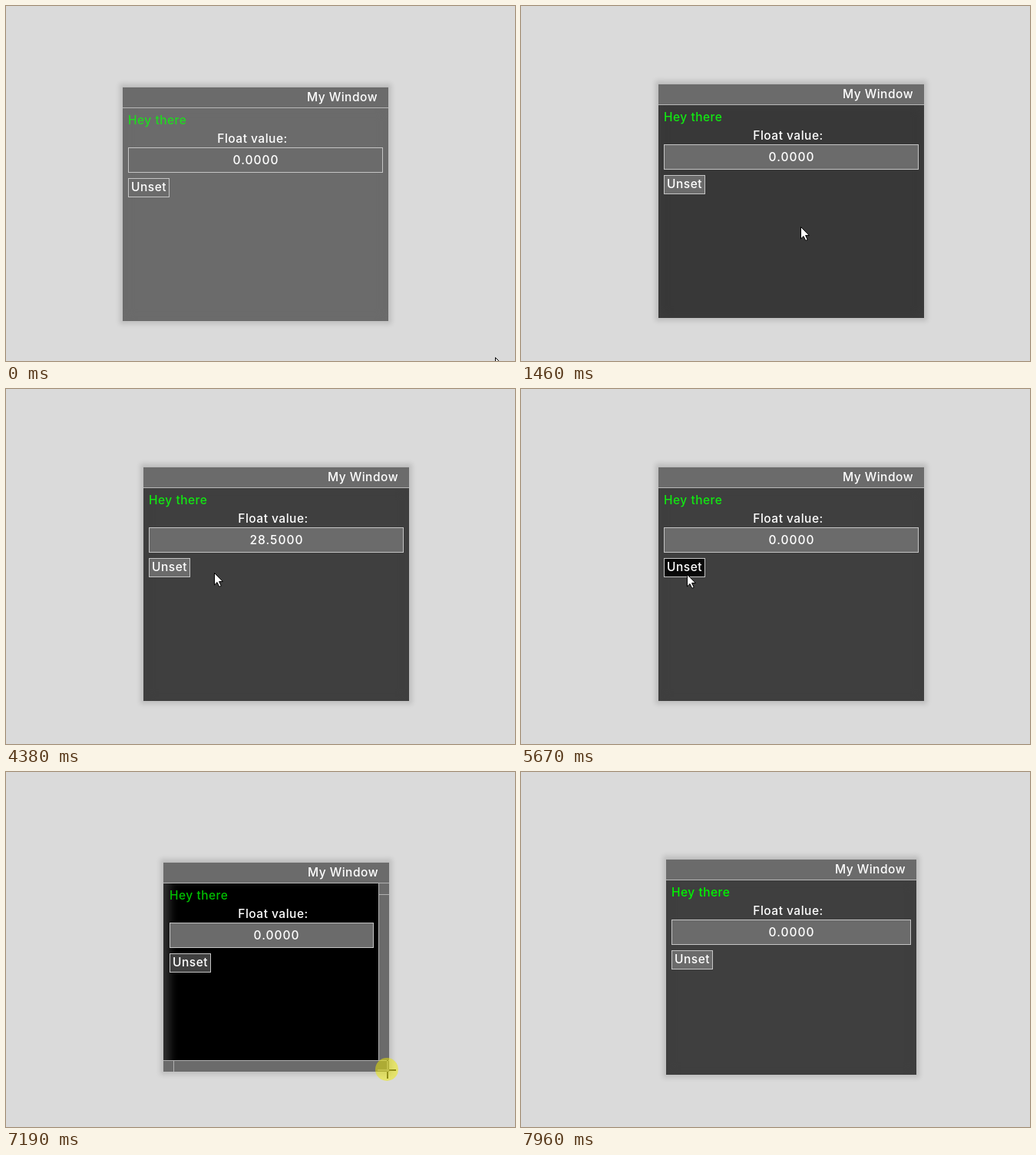
An HTML page that plays this animation: 663 px wide and 462 px high, repeating every 9.03 s.

```html
<!DOCTYPE html>
<html lang="en">
<head>
<meta charset="utf-8">
<title>My Window</title>
<style>
  html, body { margin: 0; width: 100%; height: 100%; overflow: hidden; background: #dadada; }
  body { position: relative; color: #fff; font: 500 15.5px/20px Inter, sans-serif; letter-spacing: .5px; white-space: nowrap; }
  div, svg { position: absolute; box-sizing: border-box; }
  .window, .body, .greeting, .field, .button, .content, .bar, .pointer {
    animation: 9030ms linear infinite;
  }
  .arrow, .cross, .press, .bar { animation: 9030ms step-end infinite; }

  .window { box-shadow: 0 0 6px 4px rgba(0, 0, 0, .13); animation-name: place; }
  .header { left: 0; right: 0; top: 0; height: 28px; background: #6b6b6b; border: solid #b8b8b8; border-width: 1px 0; }
  .title { right: 14px; top: 3px; }
  .body { left: 0; right: 0; top: 28px; bottom: 0; animation-name: body; }
  .content { inset: 0; animation-name: content; }
  .greeting { left: 7px; top: 34px; animation-name: greeting; }
  .label { left: -4px; right: 4px; top: 58px; text-align: center; }
  .field, .button { border: 1px solid #c4c4c4; }
  .field { left: 7px; right: 7px; top: 79px; height: 33px; animation-name: field; }
  .value { left: 0; right: 0; top: 86px; text-align: center; letter-spacing: 1px; text-indent: 1px; }
  .button { left: 7px; top: 119px; width: 54px; height: 25px; padding: 1px 0 0 3px; animation-name: button; }

  .bar { visibility: hidden; background: #6b6b6b; border: 0 solid #b0b0b0; animation-name: bar; }
  .vertical { right: 0; top: 27px; bottom: 0; width: 14px; border-left-width: 1px; }
  .horizontal { left: 0; right: 0; bottom: 0; height: 15px; border-top-width: 1px; }
  .thumb { left: 0; top: 0; border: 0 solid #b0b0b0; }
  .vertical .thumb { width: 13px; height: 16px; border-width: 1px 0; }
  .horizontal .thumb { width: 14px; height: 14px; border-right-width: 1px; }

  .pointer { animation-name: pointer; }
  .arrow { left: 0; top: 0; overflow: visible; animation-name: arrow; }
  .cross { left: -12px; top: -12px; width: 24px; height: 24px; mix-blend-mode: difference; animation-name: cross;
    background: linear-gradient(#fff, #fff) 12px 0 / 2px 24px no-repeat, linear-gradient(#fff, #fff) 0 12px / 24px 2px no-repeat; }
  .press { left: -15px; top: -15px; width: 30px; height: 30px; border-radius: 50%; background: rgba(240, 235, 0, .5); animation-name: press; }

  @keyframes place {
    0%, 7.4% { left: 152px; top: 105px; width: 346px; height: 305px; }
    11%, 75.2% { left: 179px; top: 101px; width: 346px; height: 305px; }
    79.5%, 80.2% { left: 205px; top: 117px; width: 294px; height: 273px; }
    81.2% { left: 211px; top: 122px; width: 282px; height: 263px; }
    84.2%, 100% { left: 189px; top: 113px; width: 326px; height: 281px; }
  }
  @keyframes body {
    0%, 2% { background: #6b6b6b; box-shadow: inset 0 0 14px #6b6b6b; }
    5.9%, 7.4% { background: #3f3f3f; box-shadow: inset 0 0 14px #3f3f3f; }
    11%, 16.6% { background: #383838; box-shadow: inset 0 0 14px #3d3d3d; }
    25.1%, 74.1% { background: #3f3f3f; box-shadow: inset 0 0 14px #3f3f3f; }
    74.9%, 75.2% { background: #3c3c3c; box-shadow: inset 0 0 25px #464646; }
    79.5%, 84.9% { background: #000; box-shadow: inset 12px 0 12px -4px #333; }
    88.1%, 100% { background: #3f3f3f; box-shadow: inset 0 0 14px #3f3f3f; }
  }
  @keyframes greeting {
    0%, 2% { color: #1fdc1f; }
    5.9%, 75.2% { color: #12e812; }
    79.5%, 84.9% { color: #00c000; }
    88.1%, 100% { color: #00f600; }
  }
  @keyframes content {
    0%, 78% { left: 0; right: 0; }
    78.1%, 82.4% { left: 1px; right: 13px; }
    82.5%, 100% { left: 0; right: 0; }
  }
  @keyframes field {
    0%, 22% { background: #6b6b6b; }
    25.1%, 26.4% { background: #3f3f3f; }
    30%, 44.6% { background: #000; }
    48.3%, 100% { background: #6b6b6b; }
  }
  @keyframes button {
    0%, 50% { background: #6b6b6b; }
    52.3%, 56.6% { background: #3f3f3f; }
    59.1%, 62% { background: #000; }
    68%, 84.9% { background: #3f3f3f; }
    88.1%, 100% { background: #6b6b6b; }
  }
  @keyframes bar {
    0% { visibility: hidden; }
    78.1% { visibility: visible; }
    82.5% { visibility: hidden; }
  }
  @keyframes pointer {
    0%, .5% { left: 637px; top: 457px; animation-timing-function: ease-out; }
    5.9%, 7.4% { left: 337px; top: 291px; }
    11%, 16.6% { left: 364px; top: 287px; animation-timing-function: ease-in-out; }
    25.1%, 26% { left: 357px; top: 203px; }
    32%, 34.1% { left: 289px; top: 202px; }
    34.8%, 35.4% { left: 297px; top: 202px; }
    41%, 44% { left: 412px; top: 208px; }
    48.4%, 48.9% { left: 271px; top: 239px; animation-timing-function: ease-out; }
    52.3%, 62% { left: 212px; top: 239px; animation-timing-function: ease-in-out; }
    72%, 75.2% { left: 524px; top: 405px; }
    79.5%, 80.2% { left: 496px; top: 387px; }
    81.2% { left: 491px; top: 384px; }
    84.2%, 85% { left: 514px; top: 393px; }
    88.1%, 100% { left: 530px; top: 394px; }
  }
  @keyframes arrow {
    0% { visibility: visible; }
    71.8% { visibility: hidden; }
    85% { visibility: visible; }
    88.1%, 100% { visibility: hidden; }
  }
  @keyframes cross {
    0% { visibility: hidden; }
    71.8% { visibility: visible; }
    85%, 100% { visibility: hidden; }
  }
  @keyframes press {
    0% { visibility: hidden; }
    8.1% { visibility: visible; }
    11% { visibility: hidden; }
    26.5% { visibility: visible; }
    44.6% { visibility: hidden; }
    56.7% { visibility: visible; }
    59% { visibility: hidden; }
    74.9% { visibility: visible; }
    85%, 100% { visibility: hidden; }
  }
</style>
</head>
<body>
<div class="window">
  <div class="body"></div>
  <div class="header"><div class="title">My Window</div></div>
  <div class="content">
    <div class="greeting">Hey there</div>
    <div class="field"></div>
    <div class="button">Unset</div>
  </div>
  <div class="label">Float value:</div>
  <div class="value">0.0000</div>
  <div class="bar vertical"><div class="thumb"></div></div>
  <div class="bar horizontal"><div class="thumb"></div></div>
</div>
<div class="pointer">
  <svg class="arrow" width="12" height="19">
    <path d="M.5 .5V16L4 12.6 6.8 18.4 9.3 17.2 6.6 11.6H11.4Z" fill="#fff" stroke="#000"/>
  </svg>
  <div class="cross"></div>
  <div class="press"></div>
</div>
<script>
  const LOOP = 9030;
  // Time in ms and the value dragged to at that time
  const drag = [[0, 0], [2400, 0], [2890, -34], [3080, -34], [3140, -30], [3200, -30], [3710, 28.5], [5125, 28.5], [5126, 0], [LOOP, 0]];
  const label = document.querySelector('.value');
  const clock = document.querySelector('.pointer').getAnimations()[0];

  function valueAt(time) {
    const i = drag.findIndex(([end]) => end > time);
    const [t0, v0] = drag[i - 1];
    const [t1, v1] = drag[i];
    const value = v0 + (v1 - v0) * (time - t0) / (t1 - t0);
    return Math.round(value * 2) / 2;
  }

  function update() {
    const text = valueAt((clock.currentTime || 0) % LOOP).toFixed(4);
    if (label.textContent !== text) label.textContent = text;
    requestAnimationFrame(update);
  }
  update();
</script>
</body>
</html>
```
